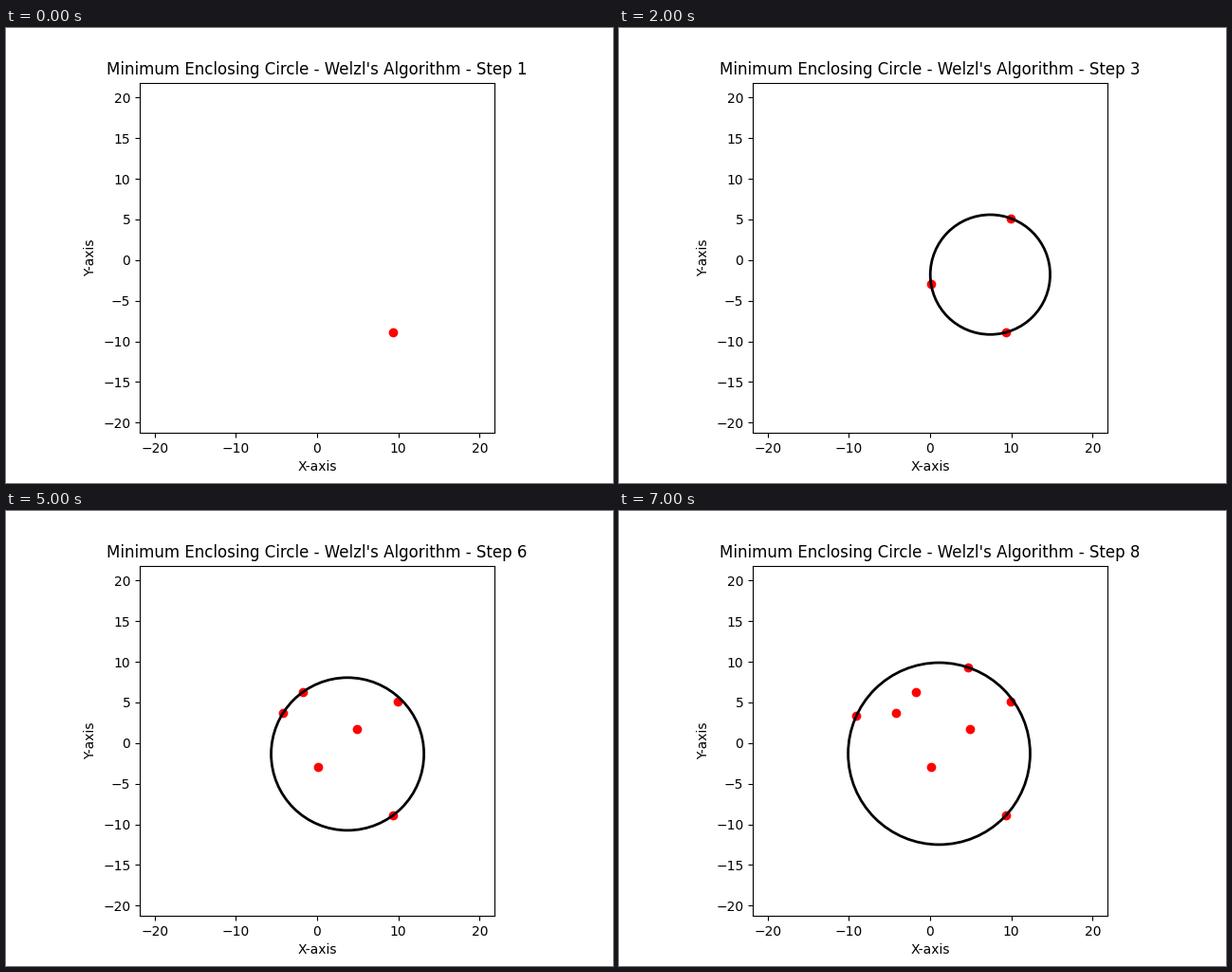
A matplotlib script for the animation above (8000 ms loop, 640x480 px).

```python
import math

import matplotlib.pyplot as plt
from matplotlib.animation import FuncAnimation

POINTS = [
    (9.335, -8.897), (9.918, 5.140), (0.117, -2.935), (-4.177, 3.716),
    (-1.750, 6.284), (4.901, 1.733), (4.667, 9.317), (-9.066, 3.366),
]


def circle_from_two(a, b):
    center = ((a[0] + b[0]) / 2, (a[1] + b[1]) / 2)
    return center, math.dist(a, b) / 2


def circle_from_three(a, b, c):
    bx, by = b[0] - a[0], b[1] - a[1]
    cx, cy = c[0] - a[0], c[1] - a[1]
    d = 2 * (bx * cy - by * cx)
    b2, c2 = bx * bx + by * by, cx * cx + cy * cy
    ux, uy = (cy * b2 - by * c2) / d, (bx * c2 - cx * b2) / d
    return (a[0] + ux, a[1] + uy), math.hypot(ux, uy)


def trivial_circle(border):
    if len(border) == 3:
        return circle_from_three(*border)
    if len(border) == 2:
        return circle_from_two(*border)
    return (border[0] if border else (0, 0)), 0 if border else -1


def welzl(points, border=()):
    """Smallest circle around points, with border points on its edge."""
    if not points or len(border) == 3:
        return trivial_circle(border)
    rest, p = points[:-1], points[-1]
    center, radius = welzl(rest, border)
    if math.dist(p, center) <= radius + 1e-9:
        return center, radius
    return welzl(rest, border + (p,))


fig, ax = plt.subplots(figsize=(6.4, 4.8), dpi=100)
ax.set_aspect("equal")
ax.set_xlim(-21.82, 21.82)
ax.set_ylim(-21.28, 21.85)
ax.set_xlabel("X-axis")
ax.set_ylabel("Y-axis")

dots, = ax.plot([], [], "ro")
ring = plt.Circle((0, 0), 1, fill=False, color="black", lw=2, zorder=3)
ax.add_patch(ring)


def update(i):
    shown = POINTS[:i + 1]
    dots.set_data(*zip(*shown))
    ring.center, ring.radius = welzl(shown)
    ring.set_visible(i > 0)
    ax.set_title(f"Minimum Enclosing Circle - Welzl's Algorithm - Step {i + 1}")
    return dots, ring


anim = FuncAnimation(fig, update, frames=len(POINTS), interval=1000, repeat=True)
plt.show()
```
